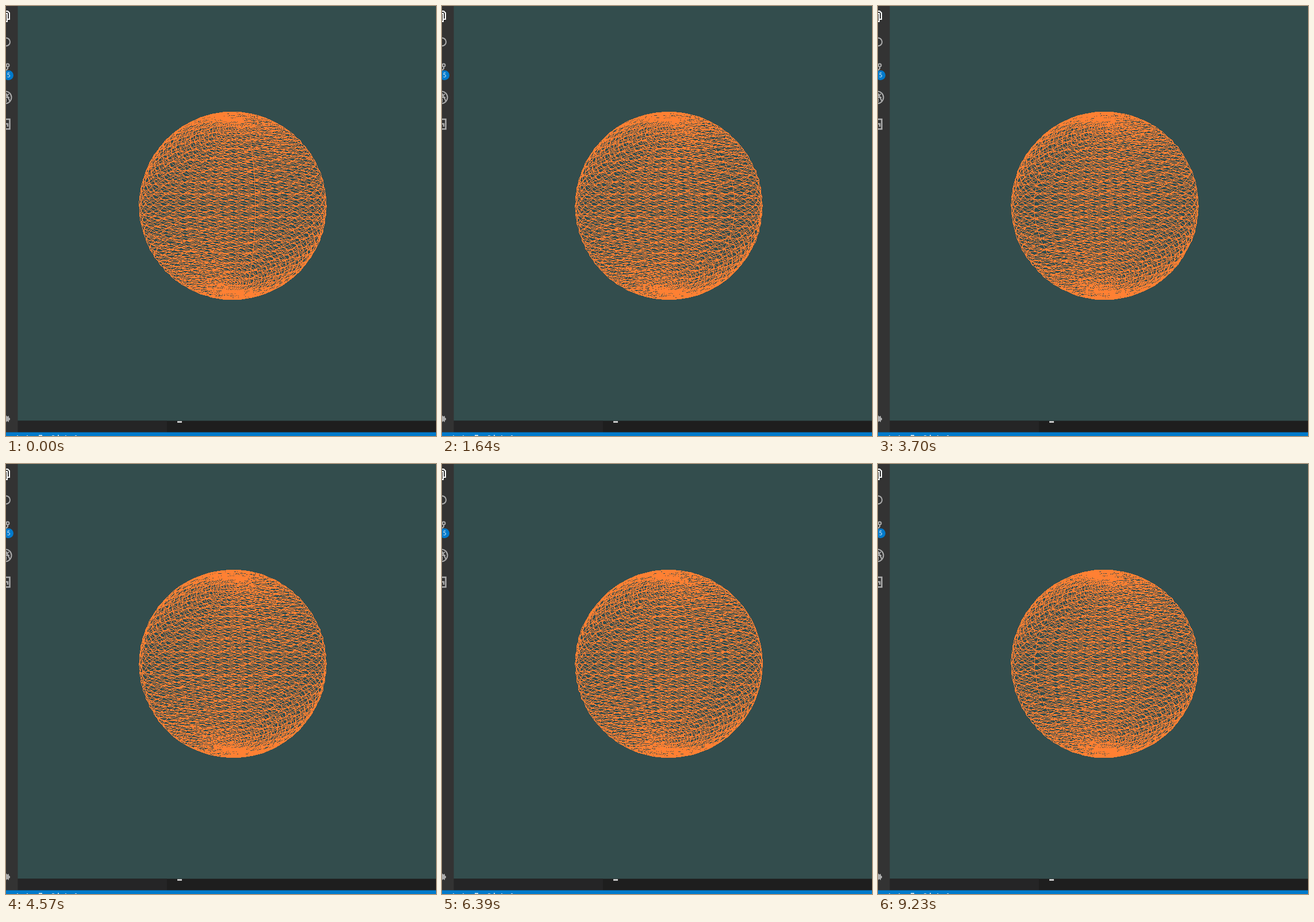
An HTML page with a canvas for the animation above (9.33 s loop, 748 by 748 pixels).

```html
<!DOCTYPE html>
<html lang="en">
<head>
<meta charset="utf-8">
<title>Wireframe sphere</title>
<style>
  html, body { margin: 0; width: 100%; height: 100%; overflow: hidden; background: #334d4d; }
  svg, canvas { position: absolute; display: block; }
  svg { left: 0; top: 0; }
  canvas { left: 230px; top: 183px; }
  text { font: 10px "Open Sans", "Noto Sans", sans-serif; fill: #fff; }
</style>
</head>
<body>
<svg width="748" height="748" viewBox="0 0 748 748">
  <rect width="748" height="748" fill="#334d4d"/>
  <rect y="721.5" width="748" height="21" fill="#1e1e1e"/>
  <rect y="721.5" width="280" height="21" fill="#252526"/>
  <rect width="20.5" height="742" fill="#333"/>
  <rect x="298" y="722" width="8" height="3" fill="#c8c8c8"/>
  <rect y="741.5" width="748" height="6.5" fill="#007acc"/>
  <g fill="#fff" opacity=".75">
    <rect x="19" y="747" width="2" height="1"/>
    <rect x="36" y="747" width="2" height="1"/>
    <rect x="57" y="746" width="6" height="2"/>
    <rect x="80" y="747" width="4" height="1"/>
    <rect x="90" y="746" width="2" height="2"/>
    <rect x="103" y="747" width="2" height="1"/>
    <rect x="120" y="747" width="3" height="1"/>
  </g>
  <g fill="none" stroke="#adadad" stroke-width="2">
    <path stroke="#fff" d="M0 9H3L6 12V23H3M0 13H2V27H0"/>
    <circle cx="0" cy="62.500" r="7"/>
    <circle cx="3" cy="103" r="2.500"/>
    <path d="M3 106V109L0 112"/>
    <circle cx="-1" cy="159" r="10.500"/>
    <path d="M0 152L7 166M0 159H6M0 157L5 153M0 161V167"/>
    <path stroke-width="2.500" d="M0 197H6.500V214H0M0 205H3V210"/>
  </g>
  <path fill="#adadad" d="M0 712L2 714L5 713V716L7 717V720L5 721V724L2 722L0 724Z"/>
  <circle cx="4.500" cy="120.500" r="8.500" fill="#007acc"/>
  <text x="1.800" y="124">5</text>
</svg>
<canvas id="view" width="330" height="330"></canvas>
<script>
const LOOP = 9330, LAST_STEP = 9230;
const SECTORS = 36, STACKS = 36, ROW = SECTORS + 1;
const DISTANCE = 2.5, FOCAL = 374, CENTRE = 164.5;
const START = 9, SPEED = 65; // degrees, degrees per second
const LINKS = [1, ROW - 2, ROW - 1]; // offsets skew the triangles and leave a seam
const ORANGE = 0xff3380ff; // ABGR
const RAD = Math.PI / 180;

const ctx = document.getElementById("view").getContext("2d");
const SIZE = ctx.canvas.width;
const image = ctx.createImageData(SIZE, SIZE);
const pixels = new Uint32Array(image.data.buffer);
const COUNT = ROW * (STACKS + 1);

function project(index, spin) {
  const lat = Math.PI / 2 - Math.floor(index / ROW) * Math.PI / STACKS;
  const lon = (index % ROW) * 2 * Math.PI / SECTORS + spin;
  const scale = FOCAL / (DISTANCE - Math.cos(lat) * Math.cos(lon));
  return [
    Math.floor(CENTRE + Math.cos(lat) * Math.sin(lon) * scale),
    Math.floor(CENTRE - Math.sin(lat) * scale)
  ];
}

// Hard-edged line, one pixel wide
function line([x0, y0], [x1, y1]) {
  const dx = Math.abs(x1 - x0), dy = -Math.abs(y1 - y0);
  const sx = Math.sign(x1 - x0), sy = Math.sign(y1 - y0);
  let error = dx + dy;
  for (;;) {
    pixels[y0 * SIZE + x0] = ORANGE;
    if (x0 === x1 && y0 === y1) return;
    const twice = 2 * error;
    if (twice >= dy) { error += dy; x0 += sx; }
    if (twice <= dx) { error += dx; y0 += sy; }
  }
}

function draw(now) {
  const time = Math.min(now % LOOP, LAST_STEP);
  const spin = (START + SPEED * time / 1000) * RAD;
  const points = Array.from({ length: COUNT }, (_, i) => project(i, spin));
  pixels.fill(0);
  for (let i = 0; i < COUNT; i++) {
    for (const link of LINKS) {
      if (i + link < COUNT) line(points[i], points[i + link]);
    }
  }
  ctx.putImageData(image, 0, 0);
}

const began = performance.now();
function tick() {
  draw(performance.now() - began);
  requestAnimationFrame(tick);
}
tick();
</script>
</body>
</html>
```
